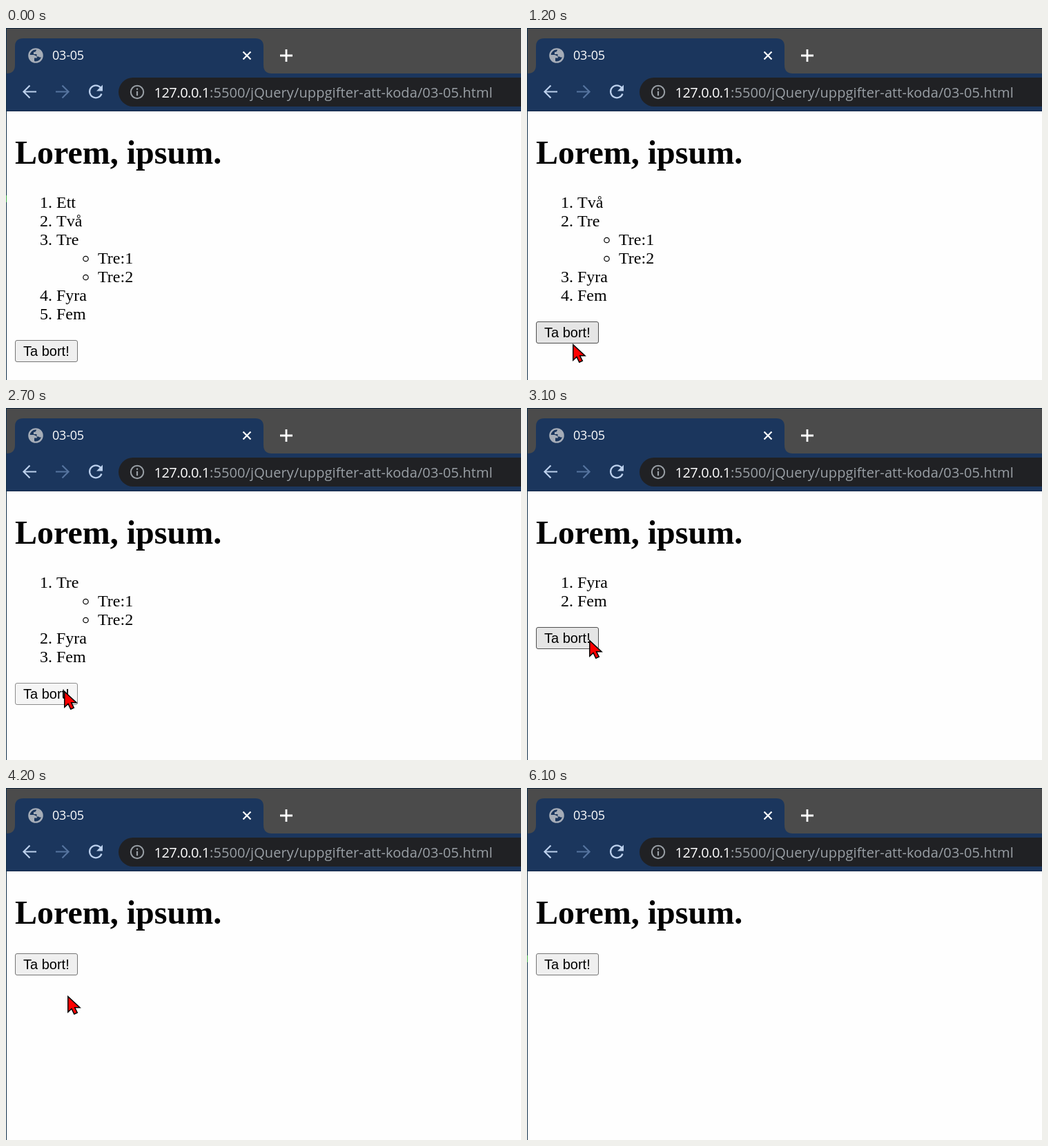
Recreate the animation shown at these times as an HTML page. Size 746 px wide and 511 px high, loop 6200 ms.

```html
<!DOCTYPE html>
<html lang="sv">
<head>
<meta charset="utf-8">
<title>03-05</title>
<style>
  html, body { margin: 0; width: 100%; height: 100%; overflow: hidden; background: #fefefe; }
  svg { display: block; width: 746px; height: 511px; }
  .ui { font-family: "Open Sans", "Noto Sans", sans-serif; }
  .page { font: 24px "Liberation Serif", "Times New Roman", serif; }
  .heading { font-size: 48px; font-weight: bold; }
  .label { font: 20px "Liberation Sans", Arial, sans-serif; }
  .icon { fill: none; stroke-width: 2.2; }
  .bullet { fill: none; stroke: #000; stroke-width: 1.2; }
  #box { fill: #efefef; stroke: #767676; }
  #box.hover { fill: #e5e5e5; stroke: #4f4f4f; }
  #box.active { fill: #f5f5f5; stroke: #8d8d8d; }
</style>
</head>
<body>
<svg viewBox="0 0 746 511">
  <!-- Browser window -->
  <rect width="746" height="511" fill="#fefefe"/>
  <rect width="746" height="66" fill="#4b4b4b"/>
  <rect y="66" width="746" height="55" fill="#1b365d"/>
  <path fill="#1b365d" d="M1 66Q13 66 13 54V27Q13 15 25 15H361Q373 15 373 27V54Q373 66 385 66Z"/>
  <rect y="120" width="746" height="1" fill="#14294a"/>
  <rect width="746" height="1" fill="#0d2238"/>
  <rect width="1" height="511" fill="#12304a"/>
  <rect id="sliver" y="243" width="1" height="10" fill="#3fae49"/>

  <!-- Tab -->
  <circle cx="43" cy="40" r="9.6" fill="none" stroke="#a6adb8" stroke-width="2.4"/>
  <path fill="#a6adb8" d="M33.5 39H40Q45 40 45 43.5H41V49Q34 48 33.5 39ZM44 31Q52 33 52.5 41Q50 44 47 41.5H44.5V38H40V35Q44 35 44 31Z"/>
  <text class="ui" x="67" y="46" font-size="18" letter-spacing="-.2" fill="#fff">03-05</text>
  <path class="icon" stroke="#fff" d="M343.5 34.5l11 11m0-11l-11 11"/>
  <path class="icon" stroke="#fff" style="stroke-width:2.8" d="M397 40h18M406 31v18"/>

  <!-- Toolbar -->
  <path class="icon" stroke="#bcd0ec" d="M44 92.5H26M34.5 83.5l-9 9 9 9"/>
  <path class="icon" stroke="#56749f" d="M72 92.5h18M81.5 83.5l9 9-9 9"/>
  <path class="icon" stroke="#bcd0ec" d="M137 86.5A9 9 0 1 0 138.500 95.5"/>
  <path fill="#bcd0ec" d="M140 82.5V91.5H131Z"/>
  <rect x="163" y="72" width="620" height="42" rx="21" fill="#202124"/>
  <circle class="icon" cx="190" cy="93" r="9.2" stroke="#9aa0a6" style="stroke-width:2"/>
  <path class="icon" stroke="#9aa0a6" d="M190 87.5v2.3M190 91.8v6.5"/>
  <g class="ui" font-size="20">
    <text x="214.5" y="101" letter-spacing="-.5" fill="#fff">127.0.0.1</text>
    <text x="295" y="101" letter-spacing=".1" fill="#9aa0a6">:5500/jQuery/uppgifter-att-koda/03-05.html</text>
  </g>

  <!-- Page -->
  <g class="page">
    <text class="heading" x="13" y="197">Lorem, ipsum.</text>
    <g id="list"></g>
  </g>
  <g id="button">
    <rect id="box" x="13.5" y=".5" width="90" height="31" rx="2.5"/>
    <text class="label" x="25" y="23">Ta bort!</text>
  </g>
  <path id="cursor" fill="#f00" stroke="#000" stroke-width="1.5" d="M.8 1.8V24.2L6 19.5 9.8 27.3 14.3 25.2 10.6 17.8H18Z"/>
</svg>
<script>
const LOOP = 6200, TICK = 100, ROW = 27;
const items = [['Ett'], ['Två'], ['Tre', 'Tre:1', 'Tre:2'], ['Fyra'], ['Fem']];
const clicks = [1100, 2000, 2800, 3400, 4100];
const entry = { x: 679, y: 73, appear: 100, vanish: 5100 };

const smooth = p => p * p * (3 - 2 * p);
const easeOut = p => 1 - (1 - p) ** 1.4;

// Each stroke continues from the last; "bend" is the control point of its curve.
const strokes = [
  { start: 100, end: 700, to: [68, 451], bend: [180, 460], ease: easeOut },
  { start: 700, end: 900, to: [66, 458] },
  { start: 1400, end: 1700, to: [78, 438] },
  { start: 2100, end: 2500, to: [84, 410] },
  { start: 2800, end: 3100, to: [90, 336] },
  { start: 3400, end: 3900, to: [89, 301] },
  { start: 4300, end: 5000, to: [691, 162], bend: [420, 320] }
];

const [list, button, box, cursor, sliver] =
  ['list', 'button', 'box', 'cursor', 'sliver'].map(id => document.getElementById(id));
const place = (node, x, y) => node.setAttribute('transform', `translate(${x} ${y})`);
const show = (node, on) => node.setAttribute('visibility', on ? 'visible' : 'hidden');
const text = (x, y, content) => `<text x="${x}" y="${y}">${content}</text>`;
const curve = (a, b, c, u) => a * (1 - u) ** 2 + 2 * b * u * (1 - u) + c * u * u;

function pointerAt(t) {
  let point = [entry.x, entry.y];
  for (const { start, end, to, bend, ease = smooth } of strokes) {
    if (t < start) break;
    const u = ease(Math.min(1, (t - start) / (end - start)));
    point = point.map((from, i) =>
      Math.round(curve(from, bend ? bend[i] : (from + to[i]) / 2, to[i], u)));
  }
  return point;
}

function drawList(removed) {
  let rows = 0, markup = '';
  const nextLine = () => 261 + ROW * rows++;
  items.slice(removed).forEach(([name, ...children], i) => {
    const y = nextLine();
    markup += text(49, y, `${i + 1}.`) + text(73, y, name);
    for (const child of children) {
      const childY = nextLine();
      markup += `<circle class="bullet" cx="115.5" cy="${childY - 7}" r="3.7"/>` + text(133, childY, child);
    }
  });
  list.innerHTML = markup;
  return rows ? 264 + ROW * rows : 240;
}

function buttonLook(t, [x, y], top) {
  if (clicks.some(click => t >= click - TICK && t < click)) return 'active';
  return x >= 13 && x <= 104 && y >= top && y <= top + 32 ? 'hover' : '';
}

let shownTick = -1;

function draw() {
  const t = Math.floor(performance.now() % LOOP / TICK) * TICK;
  if (t !== shownTick) {
    shownTick = t;
    const top = drawList(clicks.filter(click => click <= t).length);
    const pointer = pointerAt(t);
    place(button, 0, top);
    place(cursor, ...pointer);
    box.setAttribute('class', buttonLook(t, pointer, top));
    show(cursor, t >= entry.appear && t < entry.vanish);
    show(sliver, t < 800 || t >= 6100);
  }
  requestAnimationFrame(draw);
}
draw();
</script>
</body>
</html>
```
